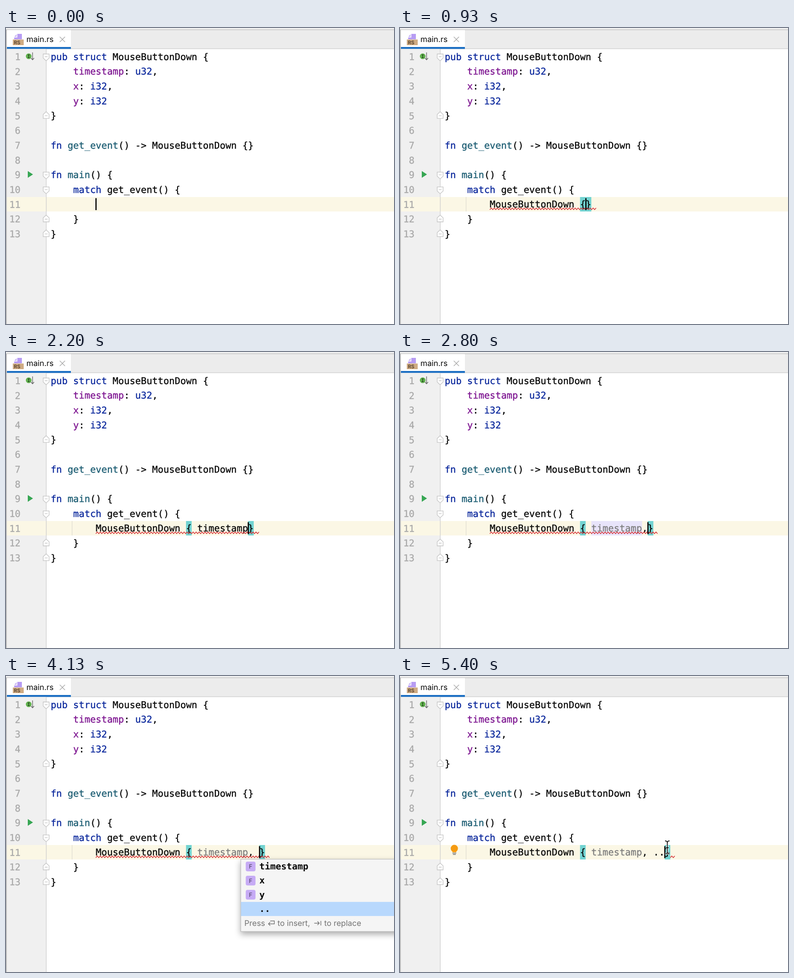
An HTML page that plays this animation: 855 by 655 pixels, repeating every 5470 ms.

```html
<!DOCTYPE html>
<html lang="en">
<head>
<meta charset="utf-8">
<title>Pattern completion</title>
<style>
html, body { margin: 0; width: 100%; height: 100%; overflow: hidden; background: #fff; }
svg { display: block; }
text { white-space: pre; text-rendering: geometricPrecision; color: #080808; }
text, tspan { fill: currentColor; }
.code, .item { stroke-width: .35; }
.code, .code tspan, .item, .item tspan { stroke: currentColor; }
.code { font: 20.65px "DejaVu Sans Mono", monospace; }
.item { font: 19.93px "DejaVu Sans Mono", monospace; }
.bold { font-weight: bold; stroke-width: 0; }
.ui { font: 17.3px Inter, sans-serif; }
.hint { color: #737373; }
.num { color: #a9a9a9; text-anchor: end; }
.tag { font: 13px Inter, sans-serif; color: #443a58; text-anchor: middle; }
.k { color: #0a279c; }
.f { color: #7d1490; }
.n { color: #1b5c72; }
.gray { color: #7d7d7d; }
.match { color: #1a62b8; }
.line { fill: none; stroke: #737373; stroke-width: 1.4; }
.popup { filter: drop-shadow(0 6px 7px rgba(0, 0, 0, .32)); }
</style>
</head>
<body>
<svg width="855" height="655" viewBox="0 0 855 655"><g id="base"></g><g id="live"></g></svg>
<script>
const LOOP = 5470, LEFT = 98.4, ADV = 12.43, PITCH = 32.68;
const base = document.getElementById('base'), live = document.getElementById('live');

const col = c => LEFT + ADV * c;
const row = n => 70.5 + PITCH * (n - 1);
const rect = (x, y, w, h, fill, more = '') =>
  `<rect x="${x}" y="${y}" width="${w}" height="${h}" fill="${fill}" ${more}/>`;
const text = (x, y, s, cls) => `<text x="${x}" y="${y}" class="${cls}">${s}</text>`;
const path = (d, more) => `<path d="${d}" ${more}/>`;

const SOURCE = `pub struct MouseButtonDown {
    timestamp: u32,
    x: i32,
    y: i32
}

fn get_event() -> MouseButtonDown {}

fn main() {
    match get_event() {

    }
}`.split('\n');

const colour = s => s.replace(/(\b(?:pub|struct|fn|match|[ui]32)\b)|(\w+(?=:))|(?<=fn )\w+/g,
  (m, key, field) => `<tspan class="${key ? 'k' : field ? 'f' : 'n'}">${m}</tspan>`);

// Fold marker: dir 1 points down, -1 points up
function fold(n, dir) {
  const y = row(n) - 7 + dir;
  return path(`M82 ${y - 7 * dir}H95V${y + 2 * dir}L88.5 ${y + 8 * dir}L82 ${y + 2 * dir}ZM85.5 ${y - dir}H91.5`,
    'fill="#fff" stroke="#c3c3c3" stroke-width="1.3"');
}

function drawBase() {
  let s = rect(0, 0, 855, 46, '#ececec') + rect(0, 0, 855, 3, '#f1f1f1') + rect(0, 3, 855, 1.5, '#c6c6c6')
    + rect(0, 45.3, 855, 1.2, '#cbcbcb')
    + rect(2, 4.5, 141, 38, '#fff') + rect(2, 42, 141, 4.3, '#1c6fc3')
    + rect(0, 46.5, 88, 609, '#f0f0f0')
    + rect(2, 374, 853, 32, '#fbf7e5')
    + rect(88, 46.5, 1.3, 609, '#cecece')
    + rect(0, 4, 1.6, 651, '#b4b4b4');
  // File icon, name and close cross
  s += path('M25 13H35V25H18V21H25Z', 'fill="#b79cf3"') + path('M18 19.5L23.5 13.5V19.5Z', 'fill="#c9b6f6"')
    + rect(15, 25.5, 24, 12.5, '#cfab83')
    + '<text x="24.5" y="36" font-family="Inter, sans-serif" font-size="11" font-weight="600" style="color:#54402c" text-anchor="middle">RS</text>'
    + text(45, 31, 'main.rs', 'ui')
    + path('M118.5 19.5L130 31M130 19.5L118.5 31', 'fill="none" stroke="#a9a9a9" stroke-width="1.4"');
  SOURCE.forEach((line, i) => {
    s += text(32, row(i + 1) + .5, i + 1, 'code num') + text(LEFT, row(i + 1), colour(line), 'code');
  });
  [1, 9, 10].forEach(n => s += fold(n, 1));
  [5, 12, 13].forEach(n => s += fold(n, -1));
  // Gutter marks
  s += '<circle cx="50" cy="62.5" r="6.3" fill="#62b24f"/>'
    + path('M48 59.5H52M50 59.5V65.5M48 65.5H52', 'fill="none" stroke="#23421c" stroke-width="1.3"')
    + path('M58.5 54V70M55 66.5L58.5 70.5L62 66.5', 'class="line" style="stroke:#666"')
    + path('M48 316.5L59.5 324L48 331.5Z', 'fill="#36a653"');
  base.innerHTML = s;
}

const HEAD = 'MouseButtonDown';
const FIELDS = ['timestamp', 'x', 'y', '..'];
const STRUCT = { at: 8, items: [HEAD], tag: 'S', tail: '{ ... }', sel: '#d9d9d9' };
const FIELD = { at: 26, items: ['timestamp'], tag: 'F', sel: '#d9d9d9' };
const ALL = { at: 37, items: FIELDS, tag: 'F', sel: '#b8d8fd' };

// Each step changes part of the editor state
const STEPS = [
  [0, { code: '', typed: 0, pick: 0 }],
  [70, { code: 'M' }],
  [200, { popup: STRUCT, typed: 1 }],
  [330, { code: 'Mo', typed: 2 }],
  [530, { code: HEAD + ' {}', popup: null }],
  [870, { guide: 1, braces: 1, wave: 'all' }],
  [1200, { code: HEAD + ' { }' }],
  [1870, { code: HEAD + ' { t}' }],
  [1930, { popup: FIELD, typed: 1 }],
  [2200, { code: HEAD + ' { timestamp}', popup: null }],
  [2470, { dim: 1, mark: 1 }],
  [2670, { code: HEAD + ' { timestamp,}' }],
  [3070, { mark: 0 }],
  [3270, { code: HEAD + ' { timestamp, }' }],
  [3470, { popup: ALL, typed: 0 }],
  [4000, { pick: 1 }],
  [4070, { pick: 2 }],
  [4130, { pick: 3 }],
  [4270, { code: HEAD + ' { timestamp, ..}', popup: null }],
  [4600, { wave: 'end' }],
  [5130, { bulb: 1 }],
  [5400, { beam: 1 }]
];

function wave(from, to) {
  let d = `M${from} 402`;
  for (let x = from + 3.3, up = 1; x <= to; x += 3.3, up ^= 1) d += `L${x} ${up ? 398.3 : 402}`;
  return path(d, 'fill="none" stroke="#d3262b" stroke-width="1.4"');
}

function hint(x, y) {
  return text(x, y, 'Press', 'ui hint') + text(x + 73, y, 'to insert,', 'ui hint') + text(x + 176, y, 'to replace', 'ui hint')
    + path(`M${x + 57} ${y - 11}H${x + 66}V${y - 4.5}H${x + 53}M${x + 57} ${y - 8.5}L${x + 53} ${y - 4.5}L${x + 57} ${y - .5}`, 'class="line"')
    + path(`M${x + 154} ${y - 6}H${x + 165}M${x + 161} ${y - 10}L${x + 165} ${y - 6}L${x + 161} ${y - 2}M${x + 168.5} ${y - 11}V${y - 1}`, 'class="line"');
}

function popup({ at, items, tag, tail, sel }, typed, pick) {
  const left = col(at) - 41, h = items.length > 1 ? 160 : 67;
  let s = `<g class="popup">${rect(left, 405.3, 430, h, '#f5f5f5', 'stroke="#b5b5b5"')}</g>`
    + rect(left + .5, 406 + 31.3 * pick, 429, 31.2, sel);
  items.forEach((name, i) => {
    const y = 428 + 31.3 * i, x = col(at);
    if (name !== '..') s += rect(left + 11, y - 17.3, 21.5, 21.5, '#c6abf5', 'rx="4"') + text(left + 21.8, y - 1.8, tag, 'tag');
    s += text(x, y, `<tspan class="match">${name.slice(0, typed)}</tspan>${name.slice(typed)}`,
      tag === 'F' ? 'item bold' : 'item');
    if (tail) s += text(x + 196.5, y, tail, 'item gray');
  });
  s += hint(left + 8, 405 + h - 12);
  [-7.3, 0, 7.3].forEach(d => s += `<circle cx="${left + 410}" cy="${405.3 + h - 18 + d}" r="2.4" fill="#5c5c5c"/>`);
  return s;
}

const BULB = '<circle cx="119.7" cy="381.6" r="8" fill="#f59b11"/>' + rect(115.5, 386, 8.5, 4, '#f59b11')
  + rect(115.5, 391, 8.5, 1.6, '#6e6e6e') + rect(116.5, 394, 6.5, 1.6, '#6e6e6e');
const BEAM_PATH = 'M584 364.8Q589 364.8 589 369V389.5Q589 393.7 584 393.7M594 364.8Q589 364.8 589 369M589 389.5Q589 393.7 594 393.7M586 380H592';
const BEAM = path(BEAM_PATH, 'fill="none" stroke="#fff" stroke-width="4"')
  + path(BEAM_PATH, 'fill="none" stroke="#111" stroke-width="1.8"');

function drawLive(st) {
  const { code } = st, end = 8 + code.length;
  const caret = code.endsWith('}') ? end - 1 : end;
  let s = '';
  if (st.guide) s += rect(145, 374, 1.2, 32, '#dedbcf');
  if (st.braces) [24, end - 1].forEach(c => s += rect(col(c), 374, ADV, 32, '#72d3d1'));
  if (st.mark) s += rect(col(26), 374, ADV * 9, 32, '#e8e4fa');
  s += text(col(8), row(11), st.dim ? code.replace('timestamp', '<tspan class="gray">$&</tspan>') : code, 'code');
  if (st.wave) s += wave(col(st.wave === 'all' ? 8 : end), col(end + 1));
  s += rect(col(caret) - .8, 376.5, 2.6, 26.5, '#000');
  if (st.popup) s += popup(st.popup, st.typed, st.pick);
  if (st.bulb) s += BULB;
  if (st.beam) s += BEAM;
  live.innerHTML = s;
}

let shown = 0;
function tick() {
  const t = performance.now() % LOOP;
  const past = STEPS.filter(([at]) => at <= t);
  if (past.length !== shown) {
    shown = past.length;
    drawLive(Object.assign({}, ...past.map(([, change]) => change)));
  }
  requestAnimationFrame(tick);
}

drawBase();
tick();
</script>
</body>
</html>
```
